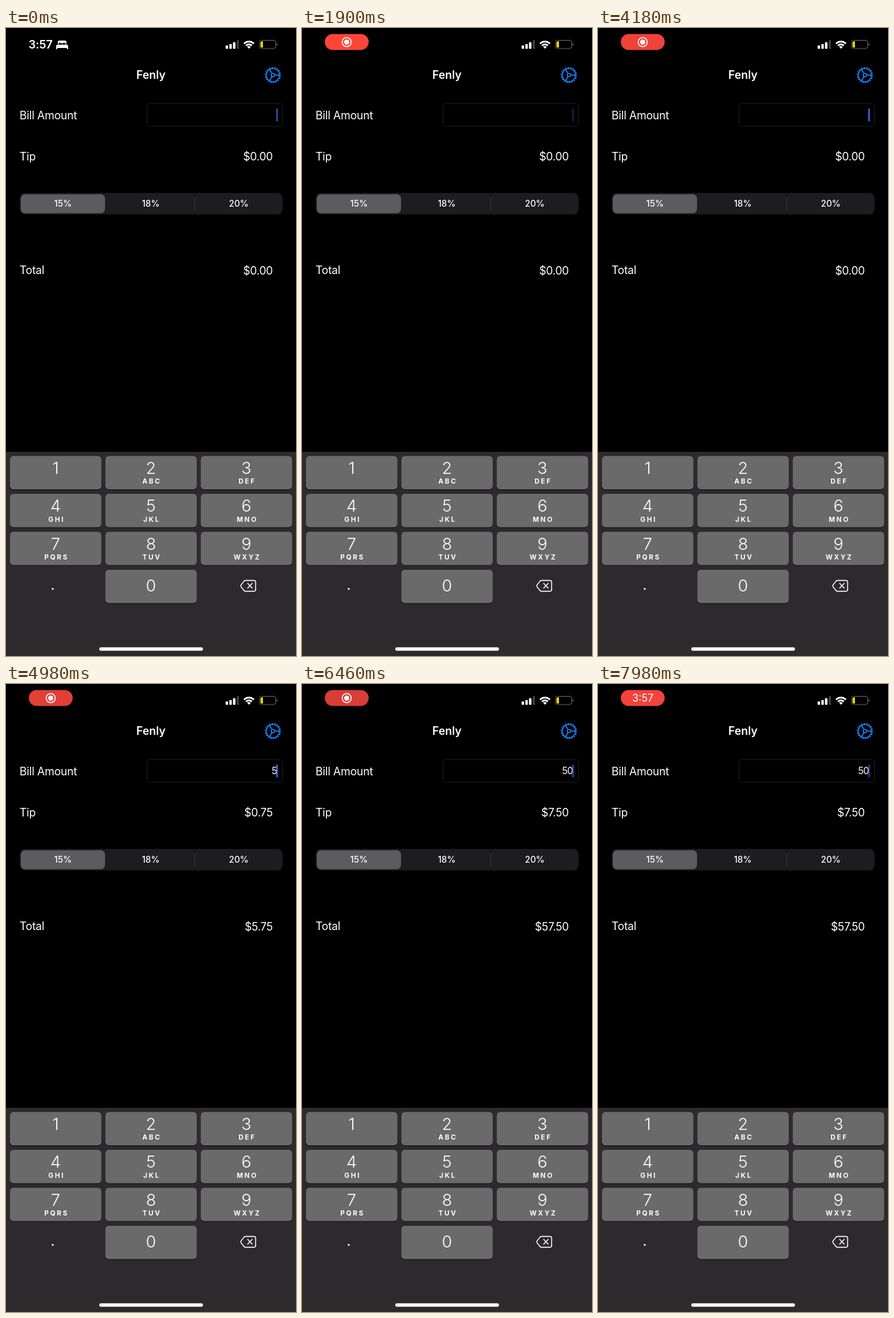
Animation, 509 px wide and 1100 px high, one loop 8 s. Source, as an HTML page:

```html
<!DOCTYPE html>
<html lang="en">
<head>
<meta charset="utf-8">
<title>Tip calculator</title>
<style>
html, body { margin: 0; width: 100%; height: 100%; overflow: hidden; background: #000; }
svg { display: block; width: 100vw; height: 100vh; }
text { font-family: Inter, Roboto, sans-serif; fill: #fff; }
.label { font-size: 19.4px; letter-spacing: -.25px; }
.title { font-size: 19.6px; font-weight: 600; text-anchor: middle; }
.clock { font-size: 20px; font-weight: 600; letter-spacing: -.2px; }
.money { font-size: 19.4px; letter-spacing: -.35px; text-anchor: end; }
.bill { font-size: 16.6px; letter-spacing: -.6px; text-anchor: end; }
.segment { font-size: 15.3px; font-weight: 500; text-anchor: middle; }
.digit { font-size: 29px; font-weight: 350; text-anchor: middle; }
.letters { font-size: 11.8px; font-weight: 700; letter-spacing: 2.7px; text-anchor: middle; }
.caret { fill: #456df5; }

/* Typing: 5 at 4.65 s, 0 at 5.1 s */
.empty, .one, .two, .held, .after { animation: 8s step-end infinite; }
.empty { animation-name: empty; }
.one { animation-name: one; }
.two { animation-name: two; }
.held { animation-name: held; }
.after { animation-name: after; }
@keyframes empty { 0% { opacity: 1 } 58.125%, 100% { opacity: 0 } }
@keyframes one { 0% { opacity: 0 } 58.125% { opacity: 1 } 63.75%, 100% { opacity: 0 } }
@keyframes two { 0% { opacity: 0 } 63.75%, 100% { opacity: 1 } }
@keyframes held { 0% { opacity: 0 } 58.125% { opacity: 1 } 73.1%, 100% { opacity: 0 } }
@keyframes after { 0% { opacity: 0 } 73.1%, 100% { opacity: 1 } }

.blink { animation: blink 1s linear infinite; }
.after .blink { animation-delay: -.53s; }
@keyframes blink {
  0%, 100% { opacity: .77 }
  5%, 40% { opacity: 1 }
  70%, 82% { opacity: 0 }
}

.idle { animation: idle 8s linear infinite; }
@keyframes idle { 0%, 3% { opacity: 1 } 6%, 100% { opacity: 0 } }
.pill { transform-origin: 78.5px 24.5px; animation: appear 8s ease-out infinite; }
@keyframes appear {
  0%, 4.5% { opacity: 0; transform: scale(.75) }
  9% { opacity: 1; transform: scale(.94) }
  12% { transform: scale(.972) }
  14%, 100% { opacity: 1; transform: none }
}
.glow { animation: glow 8s ease-in-out infinite; }
@keyframes glow {
  0% { fill: #f0433a }
  13.6%, 36%, 58.4%, 80.8% { fill: #d93d37 }
  24.8%, 47.2%, 69.6%, 91.9% { fill: #ff453a }
  100% { fill: #f3433b }
}
.record { animation: record 8s linear infinite; }
.pilltime { font-size: 18.2px; text-anchor: middle; animation: pilltime 8s linear infinite; }
@keyframes record { 0%, 94.5% { opacity: 1 } 97%, 100% { opacity: 0 } }
@keyframes pilltime { 0%, 95.5% { opacity: 0 } 98%, 100% { opacity: 1 } }
</style>
</head>
<body>
<svg viewBox="0 0 509 1100" preserveAspectRatio="none">
  <rect width="509" height="1100"/>

  <!-- Status bar -->
  <g class="idle" fill="#fff">
    <text class="clock" x="39.5" y="36.3">3:57</text>
    <path d="M91 28.5v-4q0-2.5 2.5-2.5h10q2.5 0 2.5 2.5v4h-1.6v-1.2q0-1.2-1.2-1.2h-3q-1.2 0-1.2 1.2v1.2h-1v-1.2q0-1.2-1.2-1.2h-3q-1.2 0-1.2 1.2v1.2z"/>
    <path d="M88 37v-5q0-2.7 2.7-2.7h15.6q2.7 0 2.7 2.7v5h-2v-2h-17v2z"/>
  </g>
  <g class="pill">
    <rect class="glow" x="40" y="10.5" width="77" height="28" rx="14"/>
    <g class="record">
      <circle cx="78.5" cy="24.7" r="8" fill="none" stroke="#fff" stroke-width="1.7"/>
      <circle cx="78.5" cy="24.7" r="4.5" fill="#fff"/>
    </g>
    <text class="pilltime" x="78.8" y="31.3">3:57</text>
  </g>
  <g fill="#fff">
    <rect x="385.5" y="30.5" width="4.3" height="6" rx="1.2"/>
    <rect x="392" y="28" width="4.3" height="8.5" rx="1.2"/>
    <rect x="398.4" y="24.7" width="4.3" height="11.8" rx="1.2"/>
    <rect x="404.7" y="21.3" width="4.3" height="15.2" rx="1.2" fill="#3c3c3e"/>
  </g>
  <g fill="none" stroke="#fff" stroke-width="3">
    <path d="M417.8 27.3a12.4 12.4 0 0 1 17.2 0M421.2 30.8a7.6 7.6 0 0 1 10.4 0"/>
    <path d="M426.4 36.3l-3.2-3.2a4.6 4.6 0 0 1 6.4 0z" fill="#fff" stroke="none"/>
  </g>
  <rect x="444.9" y="21.6" width="28.6" height="14.4" rx="4.3" fill="none" stroke="#66666a" stroke-width="1.2"/>
  <path d="M475 26.6q1.8.8 1.8 2.2t-1.8 2.2z" fill="#66666a"/>
  <path d="M451 23.4v10.8h-1.6q-2.7 0-2.7-2.7v-5.4q0-2.7 2.7-2.7z" fill="#ffd60a"/>

  <!-- Header -->
  <text class="title" x="254.5" y="89.3">Fenly</text>
  <g transform="translate(468.5 82.5)" fill="none" stroke="#1783f5" stroke-width="1.8">
    <circle r="11.6"/>
    <circle r="13.3" stroke-width="2" pathLength="36" stroke-dasharray="1 1"/>
    <circle r="2.9"/>
    <path d="M2.9 0H11.6M-1.5-2.5L-5.8-10M-1.5 2.5L-5.8 10"/>
  </g>

  <!-- Bill -->
  <text class="label" x="23.8" y="159.8">Bill Amount</text>
  <rect x="247.5" y="132.3" width="237.8" height="39.9" rx="6" fill="none" stroke="#232325"/>
  <text class="bill one" x="475.5" y="158.4">5</text>
  <text class="bill two" x="475.5" y="158.4">50</text>
  <g class="caret">
    <g class="empty"><rect class="blink" x="474.4" y="141" width="2.5" height="22.8" rx="1.2"/></g>
    <rect class="held" x="474.4" y="141" width="2.5" height="22.8" rx="1.2"/>
    <g class="after"><rect class="blink" x="474.4" y="141" width="2.5" height="22.8" rx="1.2"/></g>
  </g>

  <text class="label" x="23.8" y="231.5">Tip</text>
  <text class="money empty" x="468.2" y="231.5">$0.00</text>
  <text class="money one" x="468.2" y="231.5">$0.75</text>
  <text class="money two" x="468.2" y="231.5">$7.50</text>

  <rect x="24" y="289" width="461.5" height="37.6" rx="9.5" fill="#1d1d20"/>
  <rect x="26" y="291.2" width="147.8" height="33.2" rx="7.5" fill="#5c5c5e"/>
  <path d="M331.2 297v22" stroke="#3a3a3e" stroke-width="1.2"/>
  <text class="segment" x="100" y="313.4">15%</text>
  <text class="segment" x="254" y="313.4">18%</text>
  <text class="segment" x="408.5" y="313.4">20%</text>

  <text class="label" x="23.8" y="431.2">Total</text>
  <text class="money empty" x="468.2" y="432">$0.00</text>
  <text class="money one" x="468.2" y="432">$5.75</text>
  <text class="money two" x="468.2" y="432">$57.50</text>

  <!-- Keypad -->
  <rect y="742.3" width="509" height="357.7" fill="#2c2a2d"/>
  <g id="keys"></g>
  <circle cx="82" cy="982.4" r="1.7" fill="#fff"/>
  <path d="M420.5 967.6h14.7q3 0 3 3v13q0 3-3 3h-14.7q-1.5 0-2.5-1l-5.3-6.6q-1.4-1.9 0-3.8l5.3-6.6q1-1 2.5-1zM424.2 972.8l8 8.4M432.2 972.8l-8 8.4" fill="none" stroke="#fff" stroke-width="1.6" stroke-linecap="round"/>
  <rect x="163.7" y="1084.8" width="182" height="6" rx="3" fill="#fff"/>
</svg>
<script>
const letters = ["", "ABC", "DEF", "GHI", "JKL", "MNO", "PQRS", "TUV", "WXYZ"];

function key(digit, caption, column, row) {
  const x = 7 + column * 167.4, y = 749.7 + row * 66.4, middle = x + 80.1;
  return `<rect x="${x}" y="${y + 1.3}" width="160.4" height="58.3" rx="6" fill="#161517"/>
    <rect x="${x}" y="${y}" width="160.4" height="58.3" rx="6" fill="#6b6a6b"/>
    <text class="digit" x="${middle}" y="${y + (row === 3 ? 38 : 31)}">${digit}</text>
    <text class="letters" x="${middle + 1.6}" y="${y + 48.4}">${caption}</text>`;
}

document.getElementById("keys").innerHTML =
  letters.map((caption, i) => key(i + 1, caption, i % 3, Math.floor(i / 3))).join("") + key(0, "", 1, 3);
</script>
</body>
</html>
```
